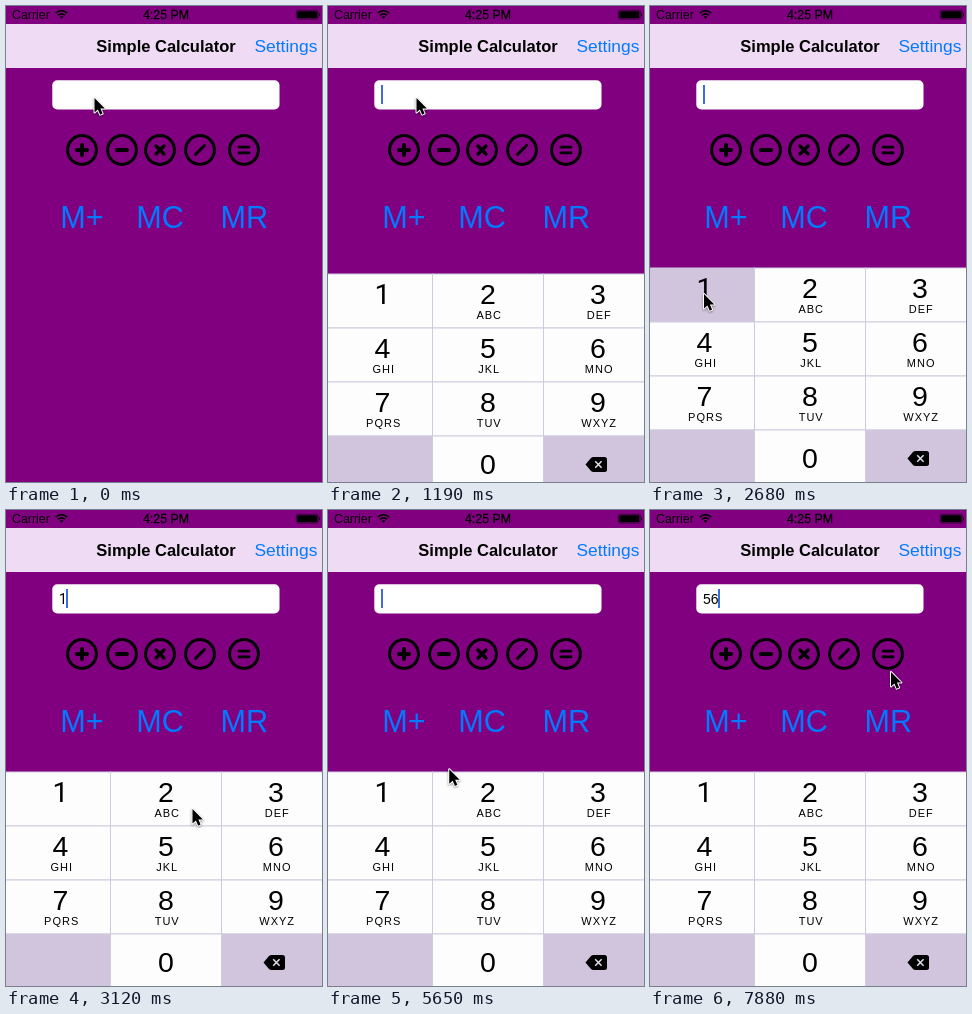
Recreate the animation shown at these times as an HTML page. Size 316 by 476 pixels, loop 8 s.

```html
<!DOCTYPE html>
<html lang="en">
<head>
<meta charset="utf-8">
<title>Simple Calculator</title>
<style>
  html, body { margin: 0; width: 100%; height: 100%; overflow: hidden; background: #800080; }
  svg { display: block; width: 316px; height: 476px; font-family: "Liberation Sans", Arial, sans-serif; }
  .blue { fill: #007aff; }
  .mem { font-size: 30.6px; }
  .digit { font-size: 28.5px; text-anchor: middle; }
  .letters { font-size: 11px; letter-spacing: 1px; text-anchor: middle; }
  .plain-one { font-family: Roboto, Inter, sans-serif; }
  .ring, .sign { fill: none; stroke: #000; stroke-linecap: round; }
  .ring { stroke-width: 3; }
  .cursor { fill: #000; stroke: #fff; stroke-width: 2; stroke-linejoin: round; paint-order: stroke;
    filter: drop-shadow(0 1px 1px rgba(0, 0, 0, .4)); }
</style>
</head>
<body>
<svg viewBox="0 0 316 476">
  <defs>
    <path id="arrow" class="cursor" d="M0 0V14.6L3.4 11.5L5.7 16.7L8.1 15.6L5.9 10.6H10.4Z"/>
  </defs>
  <rect width="316" height="476" fill="#800080"/>

  <!-- status bar -->
  <text x="6" y="13" font-size="12.4">Carrier</text>
  <g fill="none" stroke="#000" stroke-width="1.7">
    <path d="M49.8 7.2Q55.5 2.2 61.2 7.2M51.9 9.4Q55.5 6.2 59.1 9.4"/>
    <path d="M53.6 10.8Q55.5 9.2 57.4 10.8L55.5 12.8Z" fill="#000" stroke="none"/>
  </g>
  <text x="160" y="13" font-size="12.35" text-anchor="middle" stroke="#000" stroke-width=".3">4:25 PM</text>
  <rect x="290.3" y="4.3" width="22" height="8.8" rx="1.5" fill="none" stroke="#000" stroke-width=".5"/>
  <rect x="291.2" y="5.2" width="20.2" height="7" rx="1"/>
  <path d="M313 7Q315 8.7 313 10.6Z"/>

  <!-- navigation bar -->
  <rect y="18" width="316" height="44" fill="#f0dbf5"/>
  <text x="160" y="46" font-size="16.5" font-weight="bold" text-anchor="middle">Simple Calculator</text>
  <text x="248.5" y="46" font-size="17.4" class="blue">Settings</text>

  <!-- input -->
  <rect x="46.3" y="74.3" width="227.2" height="29.2" rx="5" fill="#fff"/>
  <text id="value" x="53" y="94" font-size="14"></text>
  <rect id="caret" y="79" width="2" height="19" fill="#3f6be0"/>

  <g id="operators"></g>

  <g class="blue mem">
    <text x="54.3" y="221.5">M+</text>
    <text x="130.3" y="221.5">MC</text>
    <text x="214.5" y="221.5">MR</text>
  </g>

  <g id="keyboard"></g>
  <use id="ghost" href="#arrow" x="88" y="251"/>
  <use id="cursor" href="#arrow"/>
</svg>
<script>
  const LOOP = 8000, START = 1050, TICK = 148.5;
  const WHITE = '#fdfdfe', GREY = '#d1c5de';
  const $ = id => document.getElementById(id);

  function operator(x, sign, width = 4) {
    return `<g transform="translate(${x} 144)"><circle class="ring" r="14.4"/>
      <path class="sign" d="${sign}" stroke-width="${width}"/></g>`;
  }
  $('operators').innerHTML =
    operator(76, 'M-5 0H5M0-5V5') +
    operator(116, 'M-5 0H5') +
    operator(154, 'M-4-4L4 4M4-4L-4 4', 3.4) +
    operator(194, 'M-4.5 4.5L4.5-4.5', 3) +
    operator(238, 'M-5-2.9H5M-5 2.9H5', 2.8);

  // Keyboard, laid out from its own top edge
  const ROW = 54, COLUMN = 111, KEYS_TOP = 262;
  const centers = [54.5, 160, 270];
  const letters = ' ABC DEF GHI JKL MNO PQRS TUV WXYZ'.split(' ');

  function key(n) {
    const column = (n - 1) % 3, y = Math.floor((n - 1) / 3) * ROW, x = centers[column];
    const fill = n === 10 || n === 12 ? GREY : WHITE;
    const digit = n < 10 ? n : n === 11 ? 0 : '';
    return `<rect id="key${n}" x="${column * COLUMN - 6.5}" y="${y}" width="${COLUMN}" height="${ROW}"
        fill="${fill}" stroke="#cfcbdf"/>
      <text class="digit ${n === 1 ? 'plain-one' : ''}" x="${x}" y="${y + (n < 10 ? 29.5 : 38)}">${digit}</text>
      <text class="letters" x="${x + 1.2}" y="${y + 45}">${letters[n - 1] || ''}</text>`;
  }
  $('keyboard').innerHTML = Array.from({ length: 12 }, (_, i) => key(i + 1)).join('') + `
    <path d="M257.5 190.5L263 184Q264 183 265.5 183H276.5Q279 183 279 185.5V195.5Q279 198 276.5 198H265.5Q264 198 263 197Z"/>
    <path d="M267.2 187.3L273.6 193.7M273.6 187.3L267.2 193.7" stroke="#e6dfee" stroke-width="1.5"/>`;

  // The session, in ticks: the pointer glides to each spot, then taps change the text
  const home = { x: 88.5, y: 92 };
  const moves = [
    { leave: 3, arrive: 5, x: 89.5, y: 234 },
    { leave: 5, arrive: 7, x: 54, y: 288 },
    { leave: 11, arrive: 14, x: 186.5, y: 299 },
    { leave: 18, arrive: 22, x: 75.5, y: 147.5 },
    { leave: 28, arrive: 34, x: 167, y: 371 },
    { leave: 34, arrive: 36, x: 160.5, y: 342 },
    { leave: 38, arrive: 42, x: 270, y: 353 },
    { leave: 43, arrive: 46, x: 241, y: 162 }
  ];
  const taps = [
    { at: 0, text: '' },
    { at: 12, text: '1', key: 1, hold: 2 },
    { at: 16, text: '12' },
    { at: 28, text: '' },
    { at: 37, text: '5' },
    { at: 43, text: '56', key: 6, hold: 1 }
  ];

  const ease = f => f * f * (3 - 2 * f);
  const clamp = f => Math.min(1, Math.max(0, f));
  const show = (id, on) => $(id).setAttribute('visibility', on ? 'visible' : 'hidden');

  function pointer(k) {
    let { x, y } = home;
    for (const m of moves) {
      const f = ease(clamp((k - m.leave) / (m.arrive - m.leave)));
      x += (m.x - x) * f;
      y += (m.y - y) * f;
    }
    return [x, y];
  }

  function draw(t) {
    const k = t < START ? -1 : Math.floor((t - START + 10) / TICK);
    const { at, text } = taps.filter(tap => tap.at <= k).pop() || taps[0];
    $('value').textContent = text;
    $('value').setAttribute('class', text.startsWith('1') ? 'plain-one' : '');
    $('caret').setAttribute('x', Math.floor(53 + 7.6 * text.length));
    show('caret', k >= 0 && Math.floor((k - at) / 4) % 2 === 0);

    const top = k < 0 ? 476 : KEYS_TOP + Math.round(52 * Math.pow(.12, k));
    $('keyboard').setAttribute('transform', `translate(0 ${top})`);
    show('keyboard', k >= 0);
    for (const tap of taps.filter(tap => tap.key)) {
      const down = k >= tap.at - tap.hold && k < tap.at - tap.hold + 2;
      $('key' + tap.key).setAttribute('fill', down ? GREY : WHITE);
    }

    const [x, y] = pointer(k);
    $('cursor').setAttribute('x', x);
    $('cursor').setAttribute('y', y);
    show('ghost', k === moves[0].arrive);
  }

  const begin = performance.now();
  function loop() {
    draw((performance.now() - begin) % LOOP);
    requestAnimationFrame(loop);
  }
  loop();
</script>
</body>
</html>
```
